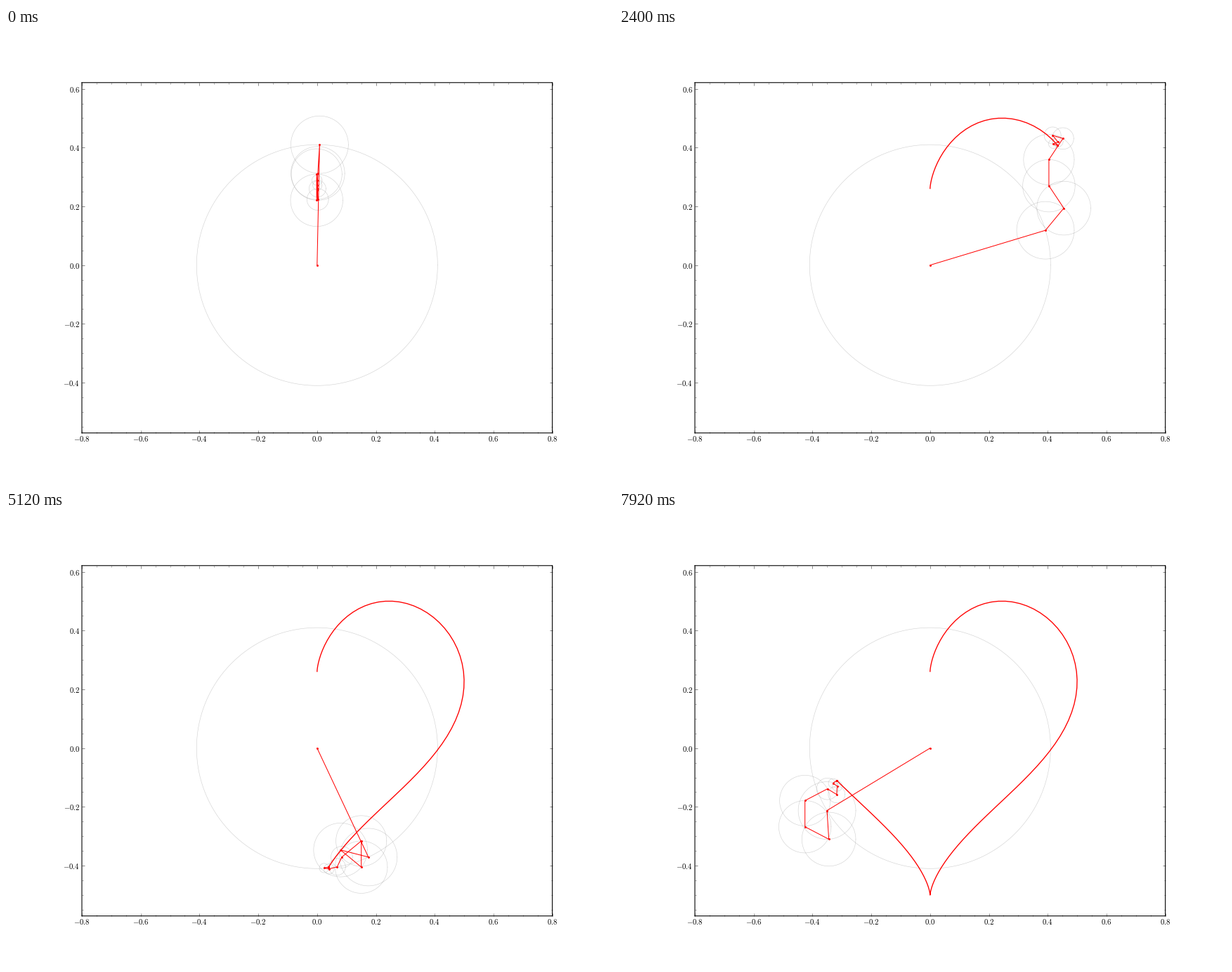
Recreate the animation shown at these times as a matplotlib script. Size 864 by 648 pixels, loop 8000 ms.

```python
import numpy as np
import matplotlib.pyplot as plt
from matplotlib.animation import FuncAnimation
from matplotlib.ticker import AutoMinorLocator

SAMPLES = 150
FRAMES = 100
CIRCLES = 40

plt.rcParams["mathtext.fontset"] = "cm"


def heart(count):
    """Closed heart curve as complex numbers, fitted to a unit square."""
    t = np.linspace(0, 2 * np.pi, count)
    x = 16 * np.sin(t) ** 3
    y = 13 * np.cos(t) - 5 * np.cos(2 * t) - 2 * np.cos(3 * t) - np.cos(4 * t)
    fit = lambda v: (v - (v.max() + v.min()) / 2) / (v.max() - v.min())
    return fit(x) + 1j * fit(y)


curve = heart(SAMPLES)
coeffs = np.fft.fft(curve) / SAMPLES
freqs = np.fft.fftfreq(SAMPLES, 1 / SAMPLES)
order = np.argsort(-np.abs(coeffs), kind="stable")
coeffs, freqs = coeffs[order], freqs[order]

# Each ring ends in a gap so that all rings fit in one line.
ring = np.append(np.exp(1j * np.linspace(0, 2 * np.pi, 200)), np.nan)
rings = np.abs(coeffs[:CIRCLES, None]) * ring

fig = plt.figure(figsize=(12, 9), dpi=72, facecolor="white")
ax = fig.add_axes([0.125, 0.11, 0.775, 0.77])
ax.set_xlim(-0.8, 0.8)
ax.set_ylim(-0.5711, 0.6211)


def set_ticks(axis, first, last, pad):
    values = np.arange(first, last + 1) / 5
    axis.set_ticks(values, [f"${v:.1f}$" for v in values])
    axis.set_minor_locator(AutoMinorLocator(4))
    axis.set_tick_params(which="major", pad=pad)


ax.tick_params(which="both", direction="in", top=True, right=True)
ax.tick_params(which="major", length=4, width=0.5, color="0.1", labelsize=10.8)
ax.tick_params(which="minor", length=2, width=0.5, color="0.3")
set_ticks(ax.xaxis, -4, 4, pad=2.2)
set_ticks(ax.yaxis, -2, 3, pad=2.8)
for spine in ax.spines.values():
    spine.set_linewidth(1.1)
    spine.set_snap(False)

ring_line, = ax.plot([], [], color="#d2d2d2", lw=0.6)
arm_line, = ax.plot([], [], color="red", lw=1, marker="o", ms=2.9, mew=0)
trace_line, = ax.plot([], [], color="red", lw=1.35)


def place(line, points):
    line.set_data(points.real, points.imag)


def update(frame):
    arms = coeffs * np.exp(2j * np.pi * freqs * frame / SAMPLES)
    joints = np.concatenate(([0], np.cumsum(arms)))
    place(ring_line, (joints[:CIRCLES, None] + rings).ravel())
    place(arm_line, joints)
    place(trace_line, curve[:frame + 1])
    return ring_line, arm_line, trace_line


anim = FuncAnimation(fig, update, frames=FRAMES, interval=80,
                     repeat=True, repeat_delay=0)
plt.show()
```
